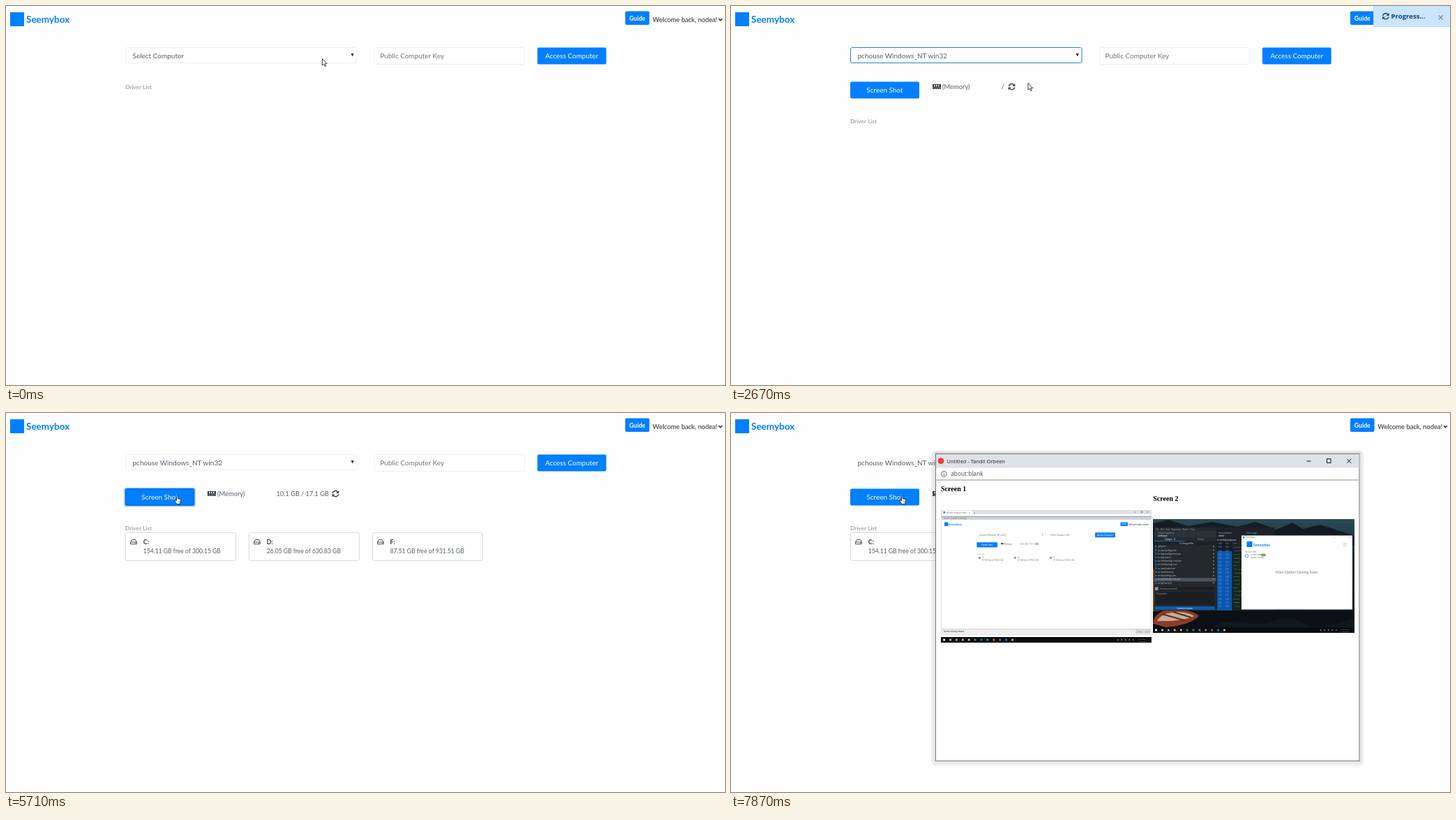
An HTML page that plays this animation: 1031 px wide and 543 px high, repeating every 8 s.

```html
<!DOCTYPE html>
<html lang="en">
<head>
<meta charset="utf-8">
<title>Remote computer panel</title>
<style>
html, body { margin: 0; width: 100%; height: 100%; overflow: hidden; background: #fefefe; }
svg { display: block; width: 1031px; height: 543px; font-family: Lato, sans-serif; }
text { white-space: pre; }
</style>
</head>
<body>
<svg id="stage" viewBox="0 0 1031 543"></svg>
<script>
const LOOP = 8000;
const BLUE = '#007fff', INK = '#55606b', GREY = '#6c757d';
const APP = 'Seemybox', HOST = 'pchouse Windows_NT win32', HELLO = 'Welcome back, nodea!';
const SANS = 'font-family="Open Sans, sans-serif"';
const SERIF = 'font-family="Liberation Serif, serif" font-weight="700"';

const rect = (x, y, w, h, fill, more = '') =>
  `<rect x="${x}" y="${y}" width="${w}" height="${h}" fill="${fill}" ${more}/>`;
const text = (x, y, size, fill, str, more = '') =>
  `<text x="${x}" y="${y}" font-size="${size}" fill="${fill}" ${more}>${str}</text>`;
const path = (d, stroke, width = 1, more = '') =>
  `<path d="${d}" fill="none" stroke="${stroke}" stroke-width="${width}" ${more}/>`;
const shape = (d, fill, more = '') => `<path d="${d}" fill="${fill}" ${more}/>`;
const dot = (x, y, r, fill, more = '') => `<circle cx="${x}" cy="${y}" r="${r}" fill="${fill}" ${more}/>`;
const group = (id, body, more = '') => `<g id="${id}" ${more}>${body}</g>`;
const repeat = (n, fn) => Array.from({ length: n }, (_, i) => fn(i)).join('');
const mid = 'text-anchor="middle"';

function sync(fill) {
  const half = path('M-4.1 -.6A4.1 4.1 0 0 1 2.9 -2.9', fill, 1.4) + shape('M4.8 -4.8V-.8H.8Z', fill);
  return half + `<g transform="rotate(180)">${half}</g>`;
}

function header() {
  return rect(6, 9, 20, 20, BLUE)
    + text(29, 24, 13.5, BLUE, APP, 'font-weight="700"')
    + rect(888, 7.6, 34.6, 19.4, BLUE, 'rx="2"')
    + text(905.3, 20.8, 8.7, '#fff', 'Guide', mid + ' font-weight="700"')
    + text(927.3, 23, 9.4, '#212529', HELLO)
    + path('M1022 18.3l2.5 2.5 2.5-2.5', '#212529', 1.4);
}

function form() {
  return rect(171.5, 59.5, 331.5, 22, '#fff', 'id="box" rx="2" stroke="#f0f0f0"')
    + rect(171.5, 59.5, 331.5, 22, 'none', 'id="focus" rx="2.5" stroke="#2b80dc"')
    + text(181.5, 75, 10, INK, '', 'id="choice"')
    + shape('M494.5 68H499.1L496.8 72.4Z', '#343a40')
    + rect(528.5, 59.5, 215, 24, '#fff', 'rx="2" stroke="#efefef"')
    + text(536.5, 75.4, 9.95, GREY, 'Public Computer Key')
    + rect(762, 59.6, 98.7, 23.9, BLUE, 'rx="2"')
    + text(811.3, 75.3, 9.95, '#fff', 'Access Computer', mid);
}

function tools() {
  const chip = rect(289, 112, 12, 4.8, '#343a40')
    + repeat(3, i => rect(291 + i * 3, 113, 1.5, 2.3, '#fff'))
    + rect(289, 117.2, 12, 1.8, '#343a40')
    + repeat(4, i => rect(291 + i * 2.6, 118, .6, 1, '#fff'));
  return rect(169.3, 106.9, 102.4, 27.2, '#80bfff', 'id="ring" rx="3.5"')
    + rect(171, 108.5, 99, 24, BLUE, 'rx="2"')
    + rect(171.5, 109, 98, 23, 'none', 'id="edge" rx="2" stroke="#0062c8"')
    + text(220.5, 124.2, 10, '#fff', 'Screen Shot', mid)
    + chip + text(303, 119, 9.4, INK, '(Memory)')
    + text(387.7, 119, 9.2, INK, '', 'id="memory"')
    + group('reload', sync('#343a40'));
}

function drive(x, name, info) {
  const disk = path('M.6 4L2.4 .6H7.6L9.4 4V6.8H.6ZM.6 4H9.4', '#495057', 1) + dot(7.6, 5.4, .6, '#495057');
  return `<g transform="translate(${x} 171)">`
    + rect(.5, .5, 158, 40, '#fefefe', 'rx="2" stroke="#dcdcdc"')
    + `<g transform="translate(7 10)">${disk}</g>`
    + text(25.7, 17, 9, '#343a40', name, 'font-weight="700"')
    + text(25.7, 30.3, 8.6, INK, info) + '</g>';
}

function toast() {
  return rect(921, -1, 111, 31, '#cce5ff')
    + path('M921.5 0V29.5H1031', '#b8daff')
    + group('spinner', sync('#004085'))
    + text(946.5, 18.2, 9.6, '#004085', 'Progress...', SANS + ' font-weight="700"')
    + path('M1014.6 13.3l6 6m0-6l-6 6', '#6a86a6', 1.2);
}

// Soft outline around a window, a little heavier below it.
function shadow(x, y, w, h, strength) {
  return repeat(6, i => {
    const k = i + 1;
    return rect(x - k, y - k * .7, w + 2 * k, h + 2 * k, 'none',
      `rx="${k}" stroke="#000" stroke-width="1.2" stroke-opacity="${strength * (1 - i / 8)}"`);
  });
}

function taskbar(x, y, w) {
  const tints = ['#fff', '#bbb', '#999', '#d8b354', '#bbb', '#3f8f50', '#2878be', '#3f8acb', '#c8703f', '#9a4fb4', BLUE, '#bbb'];
  return rect(x, y, w, 8, '#0a0c0f')
    + tints.map((c, i) => rect(x + 3.2 + i * 8.9, y + 2.6, 2.8, 2.8, c)).join('')
    + repeat(5, i => rect(x + w - 49 + i * 5.5, y + 3.2, 1.5, 1.5, '#999'))
    + text(x + w - 20, y + 3.8, 2.6, '#bbb', '11:42 AM')
    + text(x + w - 20, y + 7, 2.6, '#bbb', '6/18/2019');
}

function firstShot() {
  const tiny = (x, y, str, size = 3.2) => text(x, y, size, '#777', str);
  const disks = ['C:', 'D:', 'F:'];
  return rect(301.5, 139.5, 301, 178, '#fff', 'stroke="#ccc" stroke-width=".7"')
    + rect(302, 139.5, 300.5, 5.5, '#dee1e6')
    + rect(303, 139.8, 43, 5.4, '#fff') + rect(304.5, 141, 2.6, 2.6, BLUE)
    + tiny(309, 143.5, 'Remote computer panel', 2.8)
    + text(341, 143.7, 3.5, '#444', '×') + text(348, 143.8, 4, '#444', '+')
    + path('M578 142H581M596 140.8l2 2m0-2l-2 2', '#444', .5)
    + rect(588, 140.8, 2, 2, 'none', 'stroke="#444" stroke-width=".5"')
    + rect(302, 148, 300.5, 5, '#cfd3d8') + path('M302 148.3H602.5', '#666', .6)
    + tiny(305, 151.8, 'Screen recorder is running', 2.8)
    + rect(306, 156.5, 5.5, 5.5, BLUE) + text(312, 161.3, 4.1, BLUE, APP, 'font-weight="700"')
    + rect(558.5, 156.5, 10.5, 5.5, BLUE, 'rx=".6"') + text(563.7, 160.3, 2.7, '#fff', 'Guide', mid)
    + text(570.5, 160.7, 2.9, '#333', HELLO)
    + tiny(356, 176, HOST, 3) + shape('M446 173.6h1.6l-.8 1.6Z', '#444')
    + tiny(458, 176, 'Public Computer Key', 3)
    + rect(522, 171.2, 29, 7, BLUE, 'rx=".7"') + text(536.5, 175.8, 3, '#fff', 'Access Computer', mid)
    + rect(352.5, 185.3, 29.5, 7.2, BLUE, 'rx=".7"') + text(367.2, 190, 3, '#fff', 'Screen Shot', mid)
    + rect(387, 186.2, 3.6, 2, '#444') + tiny(391, 188.5, '(Memory)', 2.9)
    + tiny(415, 188.5, '10.1 GB / 17.1 GB', 2.9) + dot(439.5, 187.5, 1.2, 'none', 'stroke="#444" stroke-width=".6"')
    + tiny(352.5, 202.8, 'Driver List', 2.6)
    + disks.map((d, i) => {
      const x = 355 + i * 51;
      return rect(x, 206.4, 3, 2, '#777') + tiny(x + 5.5, 208.4, d, 2.7) + tiny(x + 5.5, 212, '87 GB free of 930.51 GB', 2.7);
    }).join('')
    + rect(302, 309.5, 300.5, 7, '#eeeeee') + path('M302 309.5H602.5', '#aaa', .5)
    + text(305, 314, 3, '#333', 'Screen is being shared')
    + rect(581, 311, 10, 4.6, '#ddd', 'stroke="#999" stroke-width=".4"')
    + rect(593, 311, 8, 4.6, '#ddd', 'stroke="#999" stroke-width=".4"')
    + text(586, 314.3, 2.5, '#333', 'Share', mid) + text(597, 314.3, 2.5, '#333', 'Hide', mid)
    + taskbar(301, 321, 302);
}

function landscape() {
  return rect(605, 152, 289, 163, 'url(#lake)')
    + shape('M605 158L628 153 655 162 690 156 726 163 752 156 780 166V190H605Z', '#141d23')
    + shape('M762 176L805 157 820 166 845 160 894 176V190H762Z', '#111b21')
    + shape('M605 222L612 232 608 258 614 284H605Z', '#70441f')
    + shape('M605 284H894V307H605Z', '#0a1015')
    + shape('M690 307Q710 295 735 300T780 297 820 301 894 294V307Z', '#10181d')
    + shape('M605 302Q606 281 640 281 666 284 671 291 658 304 624 307Z', '#8e3a2c')
    + shape('M611 298Q617 286 641 285 658 286 664 291 648 299 611 298Z', '#c4ae92')
    + path('M618 288L650 297M634 285L660 293', '#5b2a1c', 2);
}

function secondShot() {
  const files = ['.gitignore', 'src/app/package.json', 'src/app/package-lock.json', 'src/app/main.js',
    'src/web/package-lock.json', 'src/web/package.json', 'src/web/index.html', 'src/web/routes.js',
    'src/api/package.json', 'src/api/package-lock.json', 'src/api/server.js'];
  const label = (x, y, str, fill = '#9ba4ad', size = 2.9) => text(x, y, size, fill, str);
  return landscape()
    + rect(607, 164, 88.5, 119, '#24292e') + rect(695.5, 164, 84, 119, '#1c2228')
    + label(609, 167.5, 'File   Edit   View   Repository   Branch   Help')
    + rect(607, 169, 88.5, 9.5, '#2b3138') + label(612, 173, 'Current repository') + label(612, 176.7, 'workspace', '#fff')
    + label(622, 182.3, 'Changes  11', '#fff') + label(669, 182.3, 'History')
    + path('M607 183.6H651', '#2188ff', .7)
    + rect(607, 184.3, 88.5, 4.5, '#1d2226') + label(643, 187.6, '11 changed files', '#ddd')
    + rect(607, 236.3, 88.5, 5, '#4b545d')
    + files.map((f, i) => {
      const y = 191.2 + i * 5.22;
      return rect(608.3, y - 1, 2, 2, '#3478bd') + label(612, y + 1.1, f, '#b4bbc2')
        + rect(691.2, y - .9, 1.8, 1.8, '#a67a24');
    }).join('')
    + rect(608, 249.5, 4.5, 4.5, '#8995a1') + rect(614, 249.2, 79, 5, '#1b1f23') + label(615, 252.8, 'Summary (required)', '#8b949e')
    + rect(608, 256, 85, 19, '#1b1f23') + label(610, 259.8, 'Description', '#8b949e')
    + rect(608, 277, 85.5, 5, '#0d5aa7') + text(651, 280.6, 2.9, '#fff', 'Commit to master', mid)
    + label(699, 173, 'Current branch') + label(699, 176.7, 'master', '#fff')
    + label(739, 173, 'Fetch origin') + label(697, 182.5, 'src/web/package.json', '#ddd')
    + rect(697, 184, 21.5, 99, '#0b57ad') + rect(718.5, 184, 13.5, 99, '#15271d')
    + rect(697, 184, 21.5, 14, '#161c22') + rect(718.5, 184, 13.5, 17, '#1b2127')
    + repeat(18, i => label(699, 188 + i * 5.3, 120 + i, '#6fa6e2', 2.8) + label(709, 188 + i * 5.3, 121 + i, '#6fa6e2', 2.8)
      + rect(720 + i % 3, 186.5 + i * 5.3, 6 + (i * 5) % 6, .8, i % 4 ? '#3c6a4c' : '#66707a'))
    + rect(732, 175.5, 159, 106, '#fff') + rect(734, 177, 2.4, 2.4, BLUE) + label(738, 179.3, APP, '#777')
    + path('M864 178.3h2M886 177.2l2 2m0-2l-2 2', '#777', .4)
    + rect(739.5, 184, 8, 8, BLUE) + text(749, 191, 5.2, BLUE, APP, 'font-weight="700"')
    + path('M878 186.5h4.6m-4.6 2h4.6m-4.6 2h4.6', '#aaa', .6)
    + label(737, 200.2, 'Account info', '#777')
    + dot(739.5, 204.7, 2.2, '#fff', `stroke="${BLUE}" stroke-width=".8"`)
    + label(745, 204.2, 'current owner', '#666') + label(745, 208, 'signed in today', '#777')
    + rect(760.5, 201.8, 6, 3.3, '#28a745', 'rx=".7"') + text(763.5, 204.2, 2.2, '#fff', 'On', mid)
    + text(811.5, 230.4, 5.1, '#777', 'More Option Coming Soon.', mid)
    + taskbar(605, 307, 289);
}

function popup() {
  return shadow(293.5, 58.5, 607.5, 440, .1)
    + rect(293.5, 58.5, 607.5, 440, '#fff', 'stroke="#777"')
    + rect(294, 59, 606.5, 19.5, '#dee1e6')
    + dot(301, 68.7, 4.4, '#db4437')
    + text(309.5, 71.8, 7.5, '#222', 'Untitled - Tandil Orbeen', SANS)
    + path('M825.5 69H831.5M883.3 65.7l6 6m0-6l-6 6', '#111', 1)
    + rect(854.5, 65.8, 5.5, 5.5, 'none', 'stroke="#111"')
    + dot(305.4, 87.3, 3.9, 'none', 'stroke="#555" stroke-width=".9"')
    + path('M305.4 86.8V89.6M305.4 84.8V85.8', '#555', 1)
    + text(315.2, 90.4, 8.3, '#444', 'about:blank', SANS)
    + path('M294 96H900.5', '#8d8d8d', 1.2)
    + group('page', text(301, 112.3, 10, '#000', 'Screen 1', SERIF) + text(605.3, 125.5, 10, '#000', 'Screen 2', SERIF)
      + firstShot() + secondShot());
}

function menu() {
  const row = (id, y, str) => rect(172, y, 331, 20.5, '#fff', `id="${id}"`) + text(181.5, y + 14.6, 10, INK, str, `id="${id}Text"`);
  return row('top', 82, 'Select Computer') + row('low', 102.3, HOST)
    + path('M171.5 81.5H503V122.8H171.5Z', '#3f8fe2');
}

const stage = document.getElementById('stage');
stage.innerHTML = `<defs><linearGradient id="lake" x2="0" y2="1">
  <stop stop-color="#2c4a59"/><stop offset=".3" stop-color="#172a34"/><stop offset="1" stop-color="#0a1015"/></linearGradient></defs>`
  + rect(0, 0, 1031, 543, '#fefefe') + header() + form() + group('tools', tools())
  + text(171, 119, 8.4, '#868e96', 'Driver List', 'id="list"')
  + group('drives', drive(171, 'C:', '154.11 GB free of 300.15 GB') + drive(348, 'D:', '26.05 GB free of 630.83 GB')
    + drive(525, 'F:', '87.51 GB free of 931.51 GB'))
  + group('toast', toast()) + group('menu', menu())
  + group('ghost', shadow(298.5, 62.5, 597, 431.5, .05)
    + rect(298.5, 62.5, 597, 431.5, '#fff', 'fill-opacity=".64" stroke="#a0a0a0"'))
  + group('popup', popup())
  + group('arrow', shape('M.5 .5V10.2L2.7 8.2 4.2 11.6 5.8 10.9 4.3 7.6H7.3Z', '#fff', 'stroke="#111" stroke-width=".8"'))
  + group('hand', shape('M3 1.2C3 0 4.7 0 4.7 1.2V4.6L8 5.4Q9.2 5.9 9 7.4L8.2 12.4H3.6L.6 8.4Q.1 6.6 1.7 7L3 8Z', '#fff',
    'stroke="#111" stroke-width=".8"') + path('M5.4 8V10.4M7 8V10.4', '#333', .5), 'transform="translate(241.5 118)"');

const ui = {};
stage.querySelectorAll('[id]').forEach(n => ui[n.id] = n);
const show = (node, on) => node.setAttribute('display', on ? 'inline' : 'none');
const set = (node, key, value) => node.setAttribute(key, value);

// The screen refreshes only at these moments.
const TICKS = [0, 680, 860, 980, 1100, 1250, 1370, 1770, 1920, 2040, 2160, 2280, 2430, 2550, 2670, 2820, 2940,
  3090, 3210, 3330, 3450, 3850, 3970, 4120, 4240, 4360, 4510, 5470, 5590, 5710, 7520, 7660, 7870];
const POINTER = [[0, 453, 75], [680, 453, 75], [1100, 439, 90], [1250, 429, 103], [1370, 425.5, 110], [3090, 425.5, 110],
  [3450, 422, 108], [3730, 422, 108], [3970, 369, 115], [4360, 245, 118]];

const ramp = (t, a, b) => Math.min(1, Math.max(0, (t - a) / (b - a)));

function pointerAt(t) {
  const i = POINTER.findIndex(p => p[0] > t);
  if (i < 0) return POINTER[POINTER.length - 1].slice(1);
  const [a, b] = [POINTER[i - 1], POINTER[i]];
  const k = ramp(t, a[0], b[0]);
  return [a[1] + (b[1] - a[1]) * k, a[2] + (b[2] - a[2]) * k];
}

function draw(time) {
  const t = TICKS.filter(v => v <= time).pop();
  const chosen = t >= 1770, loaded = t >= 3090, onButton = t >= 4360, left = t >= 7870;

  ui.choice.textContent = chosen ? HOST : 'Select Computer';
  set(ui.focus, 'opacity', ramp(t, 560, 980) * (1 - ramp(t, 5350, 5710)));
  show(ui.box, !left);

  show(ui.menu, t >= 680 && !chosen);
  const second = t >= 1250;
  for (const [id, on] of [['top', !second], ['low', second]]) {
    set(ui[id], 'fill', on ? '#1e90ff' : '#fff');
    set(ui[id + 'Text'], 'fill', on ? '#fff' : INK);
  }

  show(ui.tools, chosen);
  set(ui.list, 'y', chosen ? 168 : 119);
  ui.memory.textContent = loaded ? '10.1 GB / 17.1 GB' : '/';
  set(ui.reload, 'transform', `translate(${loaded ? 472.5 : 402.5} 115.7)`);
  show(ui.drives, loaded);

  show(ui.toast, chosen && t < 3450);
  set(ui.toast, 'opacity', 1 - ramp(t, 2970, 3450));
  set(ui.spinner, 'transform', `translate(938.8 14.7) rotate(${(t - 2670) * .18})`);

  set(ui.edge, 'opacity', left ? 0 : ramp(t, 4240, 4510));
  set(ui.ring, 'opacity', left ? 0 : ramp(t, 5350, 5710));

  const [x, y] = pointerAt(t);
  set(ui.arrow, 'transform', `translate(${x} ${y})`);
  show(ui.arrow, !onButton);
  show(ui.hand, onButton);

  show(ui.ghost, t === 7520);
  show(ui.popup, t >= 7660);
  show(ui.page, left);
}

const start = performance.now();
function loop() {
  draw((performance.now() - start) % LOOP);
  requestAnimationFrame(loop);
}
draw(0);
requestAnimationFrame(loop);
</script>
</body>
</html>
```
